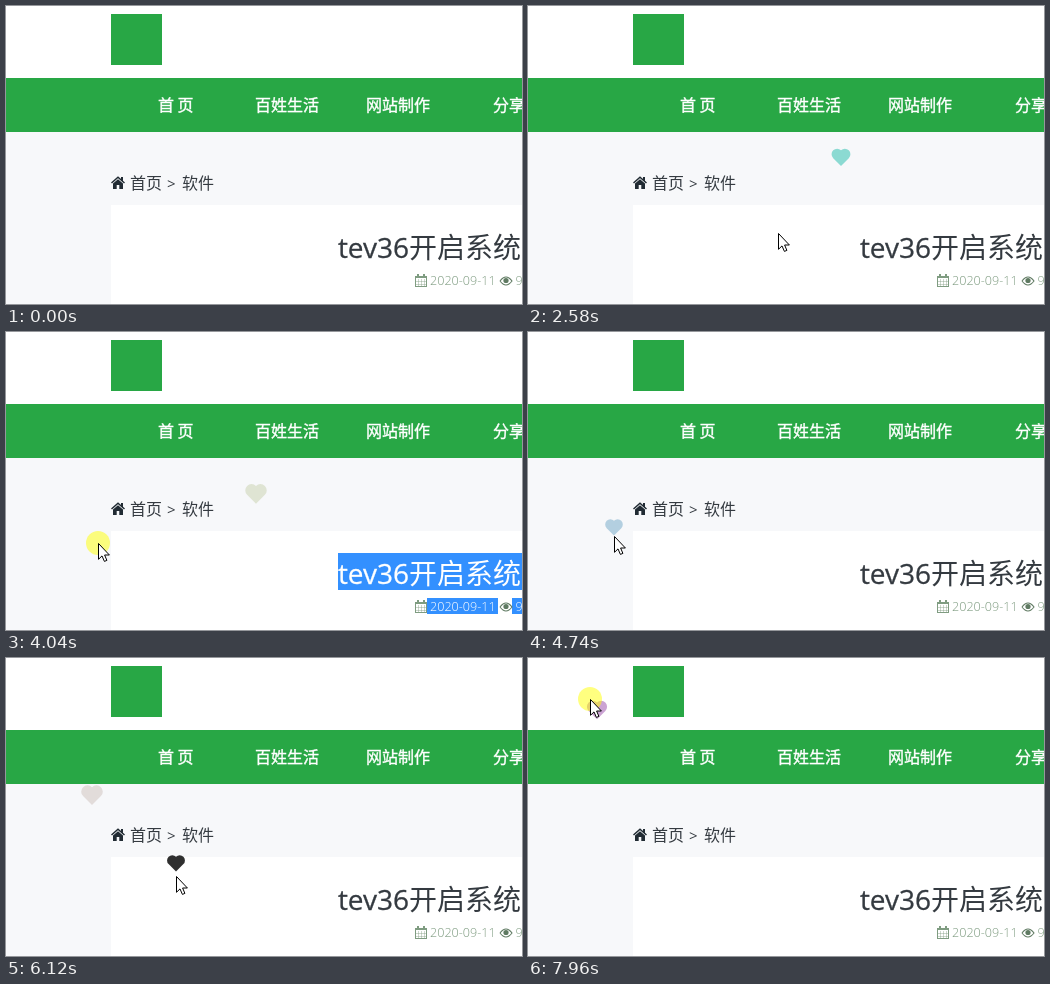
An HTML page with a canvas that plays this animation: 516 by 298 pixels, repeating every 8 s.

```html
<!DOCTYPE html>
<html lang="zh">
<head>
<meta charset="utf-8">
<title>点击爱心</title>
<style>
html, body { margin: 0; width: 100%; height: 100%; overflow: hidden; background: #fff; }
canvas { display: block; }
</style>
</head>
<body>
<canvas id="stage" width="516" height="298"></canvas>
<script>
const ctx = document.getElementById('stage').getContext('2d');
const LOOP = 8000, STEP = 76.8, FIRST = 430, HOLD = 185;
const GREEN = '#28a745', DARK = '#343a40', MUTED = '#7f9c81', BLUE = '#3390ff';
const CJK = '"Noto Sans CJK SC", "Noto Sans CJK", "Noto Sans CJK JP", sans-serif';
const LATIN = '"Open Sans", sans-serif';

// where the pointer rests, and the buttons it releases there;
// bend is the control point of a curved way in
const stops = [
  { at: 430, until: 430, x: 369, y: 196 },
  { at: 590, until: 1440, x: 341, y: 169, press: [{ up: 990, color: '#0963ee' }] },
  { at: 1800, until: 2170, x: 313, y: 178, press: [{ up: 2150, color: '#54cabe' }] },
  { at: 2560, until: 2980, x: 250, y: 227, press: [{ up: 2970, color: '#6a8215' }] },
  { at: 3500, until: 3580, x: 177, y: 230 },
  { at: 4190, until: 4430, x: 77, y: 208, press: [{ up: 4420, hold: 850 }] },
  { at: 4500, until: 5290, x: 86, y: 204,
    press: [{ up: 4600, color: '#aac9dc' }, { up: 5015, color: '#663624' }] },
  { at: 5690, until: 6100, x: 170, y: 218, press: [{ up: 5915, color: '#0a0a0a' }] },
  { at: 6880, until: 7260, x: 69, y: 98, bend: [-70, -2], press: [{ up: 7205, color: '#812296' }] },
  { at: 7800, until: LOOP, x: 62, y: 41, press: [{ up: 8050 }] }
];
const presses = stops.flatMap(({ x, y, press = [] }) =>
  press.map(p => ({ x, y, hold: HOLD, ...p })));

function rect(color, x, y, w, h) {
  ctx.fillStyle = color;
  ctx.fillRect(x, y, w, h);
}

function text(str, x, y, font, color, { align = 'left', bold = 0 } = {}) {
  ctx.font = font;
  ctx.fillStyle = ctx.strokeStyle = color;
  ctx.textAlign = align;
  ctx.fillText(str, x, y);
  if (bold) {
    ctx.lineWidth = bold;
    ctx.strokeText(str, x, y);
  }
}

function poly(points, x, y) {
  ctx.beginPath();
  points.forEach(([px, py]) => ctx.lineTo(x + px, y + py));
  ctx.closePath();
}

function home(x, y) {
  ctx.fillStyle = ctx.strokeStyle = '#212b33';
  ctx.lineWidth = 1.5;
  ctx.beginPath();
  ctx.moveTo(x + .5, y + 7);
  ctx.lineTo(x + 7, y + 1.3);
  ctx.lineTo(x + 13.5, y + 7);
  ctx.stroke();
  ctx.fillRect(x + 10, y + 1, 2, 4);
  poly([[2, 7.5], [7, 3.3], [12, 7.5], [12, 13], [8.3, 13], [8.3, 9],
        [5.7, 9], [5.7, 13], [2, 13]], x, y);
  ctx.fill();
}

function calendar(x, y) {
  ctx.strokeStyle = MUTED;
  ctx.lineWidth = 1;
  ctx.strokeRect(x + .5, y + 2.5, 11, 10);
  rect(MUTED, x, y + 2, 12, 2);
  for (const dx of [2, 8]) rect(MUTED, x + dx, y, 2, 3);
  ctx.globalAlpha = .4;
  for (let i = 1; i < 4; i++) rect(MUTED, x + i * 3, y + 5, 1, 7);
  for (let i = 0; i < 2; i++) rect(MUTED, x + 1, y + 7 + i * 3, 10, 1);
  ctx.globalAlpha = 1;
}

function eye(x, y) {
  ctx.strokeStyle = ctx.fillStyle = '#5f7a62';
  ctx.lineWidth = 1.1;
  ctx.beginPath();
  ctx.moveTo(x - 6, y);
  ctx.quadraticCurveTo(x, y - 8, x + 6, y);
  ctx.quadraticCurveTo(x, y + 8, x - 6, y);
  ctx.stroke();
  ctx.beginPath();
  ctx.arc(x, y - .5, 2.6, 0, 7);
  ctx.fill();
}

function page(selected) {
  rect('#fff', 0, 0, 516, 298);
  rect('#f7f8fa', 0, 126, 516, 172);
  rect('#fff', 105, 199, 411, 99);
  rect(GREEN, 105, 8, 51, 51);
  rect(GREEN, 0, 72, 516, 54);

  [['首 页', 152], ['百姓生活', 249], ['网站制作', 360], ['分享', 487]]
    .forEach(([s, x]) => text(s, x, 105, '16px ' + CJK, '#fff', { bold: .4 }));

  home(105, 170);
  text('首页', 124, 183, '16px ' + CJK, DARK);
  text('>', 161, 183, '15px ' + LATIN, DARK);
  text('软件', 176, 183, '16px ' + CJK, DARK);

  if (selected) {
    rect(BLUE, 332, 221, 184, 37);
    rect(BLUE, 421, 266, 71, 16);
    rect(BLUE, 506, 266, 10, 16);
  }
  const head = selected ? '#fff' : DARK, meta = selected ? '#fff' : MUTED;
  text('tev36', 403, 252, '500 28px ' + LATIN, head, { align: 'right', bold: .3 });
  text('开启系统', 403, 252, '28px ' + CJK, head);

  const small = '300 12.6px ' + LATIN;
  calendar(409, 268);
  text('2020-09-11', 424, 279, small, meta);
  eye(500, 275);
  text('9', 509.5, 279, small, meta);
}

function pointerAt(t) {
  const i = stops.findIndex(s => s.at > t);
  const a = stops.at(i < 0 ? -1 : i - 1);
  if (i < 0 || t <= a.until) return [a.x, a.y];
  const b = stops[i], p = (t - a.until) / (b.at - a.until);
  const s = p * p * (3 - 2 * p);
  const [cx, cy] = b.bend || [(a.x + b.x) / 2, (a.y + b.y) / 2];
  const mix = (u, c, v) => Math.round(u * (1 - s) ** 2 + 2 * c * s * (1 - s) + v * s * s);
  return [mix(a.x, cx, b.x), mix(a.y, cy, b.y)];
}

// rises one pixel per 60 Hz tick while growing and fading
function heart(t, { up, x, y, color }) {
  const n = (t - up) * .06;
  if (!color || n < 0 || n >= 76) return;
  ctx.save();
  ctx.translate(x, y - n);
  ctx.rotate(Math.PI / 4);
  ctx.scale(1 + n * .004, 1 + n * .004);
  ctx.globalAlpha = 1 - n * .013;
  ctx.fillStyle = color;
  ctx.beginPath();
  ctx.rect(-5, -5, 10, 10);
  for (const [cx, cy] of [[0, -5], [-5, 0]]) {
    ctx.moveTo(cx + 5, cy);
    ctx.arc(cx, cy, 5, 0, Math.PI * 2);
  }
  ctx.fill();
  ctx.restore();
}

function glow(x, y) {
  ctx.fillStyle = 'rgba(255,255,0,.5)';
  ctx.beginPath();
  ctx.arc(x, y, 12, 0, 7);
  ctx.fill();
}

function pointer(x, y) {
  poly([[.5, .5], [.5, 16.3], [4, 12.9], [6.4, 18.4], [8.9, 17.4],
        [6.6, 12], [11.4, 12]], x, y);
  ctx.fillStyle = '#fff';
  ctx.strokeStyle = '#000';
  ctx.lineWidth = 1;
  ctx.fill();
  ctx.stroke();
}

function draw(now) {
  const t = FIRST + STEP * Math.floor((now % LOOP - FIRST + 3) / STEP);
  page(t > 3700 && t < 4500);
  if (t < FIRST) return;
  presses.forEach(p => heart(t, p));
  const [x, y] = pointerAt(t);
  if (presses.some(p => t >= p.up - p.hold && t < p.up)) glow(x, y);
  pointer(x, y);
}

const begin = performance.now();
function tick() {
  draw(performance.now() - begin);
  requestAnimationFrame(tick);
}
tick();
</script>
</body>
</html>
```
